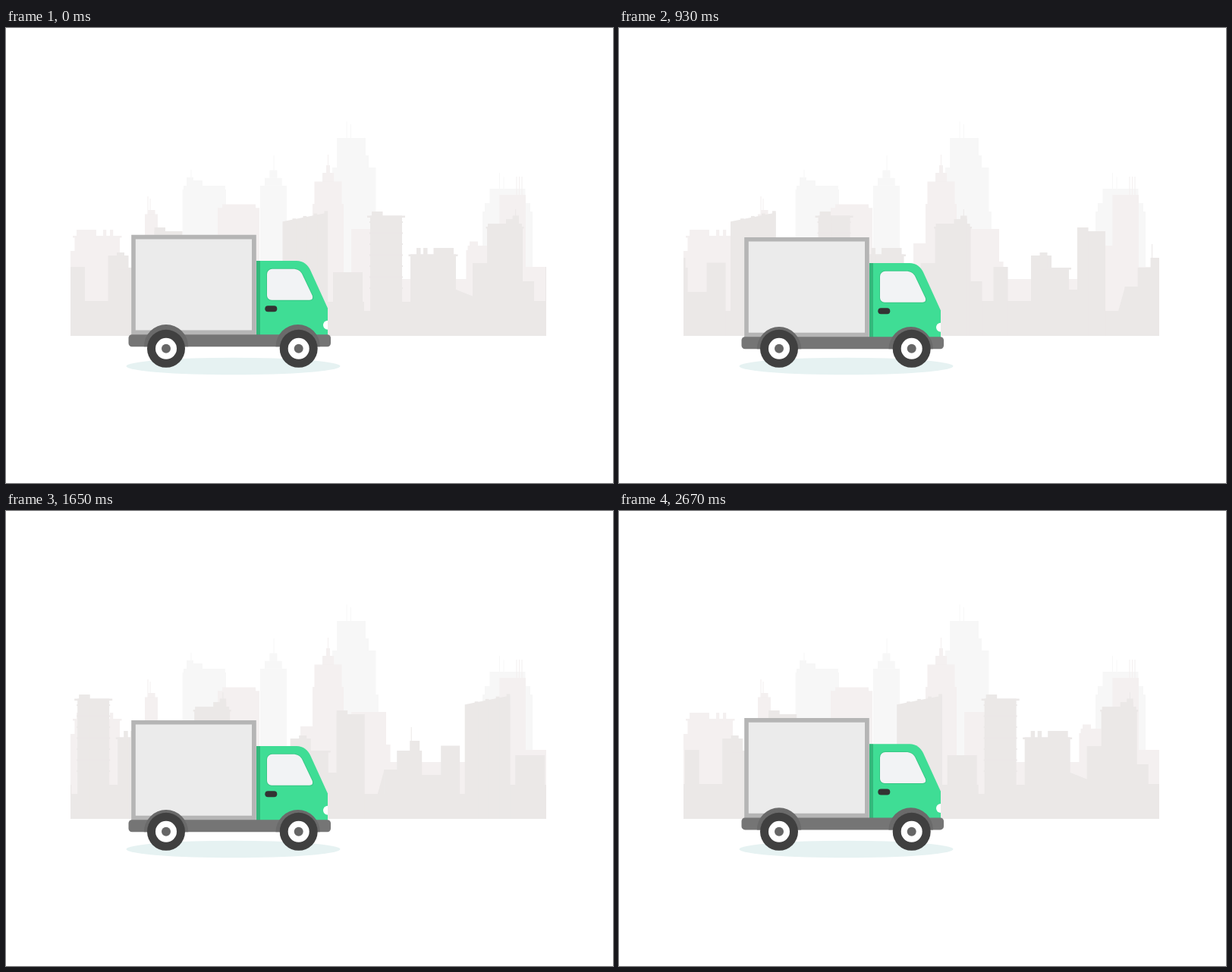
An HTML page with a canvas that plays this animation: 800x600 px, repeating every 2.7 s.

```html
<!DOCTYPE html>
<html lang="en">
<head>
<meta charset="utf-8">
<title>Delivery truck</title>
<style>
  html, body { margin: 0; width: 100%; height: 100%; overflow: hidden; background: #fff; }
  canvas { display: block; width: 800px; height: 600px; }
</style>
</head>
<body>
<canvas id="stage" width="800" height="600"></canvas>
<script>
const ctx = document.getElementById('stage').getContext('2d');
const LOOP = 2700, STEP = 30;
const BASE = 406, LEFT = 85, RIGHT = 712;
const TILE = 626, SPEED = 0.23383;
const REAR = 211, FRONT = 385.7;

function shape(color, trace) {
  ctx.fillStyle = color;
  ctx.beginPath();
  trace();
  ctx.fill();
}

const rect = (x, y, w, h, color) => shape(color, () => ctx.rect(x, y, w, h));
const rounded = (x, y, w, h, r, color) => shape(color, () => ctx.roundRect(x, y, w, h, r));
const disc = (x, y, r, color) => shape(color, () => ctx.arc(x, y, r, 0, Math.PI * 2));

// City helpers paint in the layer's current fill colour.
const block = (x1, x2, top, bottom = BASE) => ctx.fillRect(x1, top, x2 - x1, bottom - top);

function ledged(x1, x2, top, overhang) {
  block(x1, x2, top);
  block(x1 - overhang, x2 + overhang, top, top + 2.5);
}

// Symmetric tower of nested tiers, each given by half width and top.
function tower(center, ...tiers) {
  tiers.forEach(([half, top]) => block(center - half, center + half, top));
}

function antenna(x, top, height) {
  block(x - 0.5, x + 0.5, top, top + height);
}

function slope(x1, y1, x2, y2) {
  ctx.beginPath();
  ctx.moveTo(x1, BASE);
  ctx.lineTo(x1, y1);
  ctx.lineTo(x2, y2);
  ctx.lineTo(x2, BASE);
  ctx.fill();
}

function farCity() {
  ctx.fillStyle = '#f7f7f7';
  tower(261.3, [27.5, 208], [28.7, 213]);
  block(238, 259, 201);
  block(238, 247, 197);
  antenna(244, 187, 10);

  for (let i = 0; i < 3; i++) tower(352.4, [5 + 6.3 * i, 187.5 + 10.2 * i]);
  antenna(353, 168, 20);

  block(436, 474, 145);
  block(436, 478, 168);
  block(430, 487.5, 184);
  block(430, 491, 242);
  for (const x of [449, 454.5]) antenna(x, x / 1.5 - 176, 24);

  tower(661, [23.5, 212], [30, 231], [33, 242]);
  for (const x of [650.5, 656]) antenna(x, x - 459.5, 22);
}

function midCity() {
  ctx.fillStyle = '#f4f0f0';
  block(LEFT, 183, 323);
  block(445, RIGHT, 331);

  block(LEFT, 150, 294);
  ledged(90.5, 150, 274, 2.5);
  block(93, 119, 266);
  for (const x of [128, 137]) block(x, x + 4.3, 266);

  tower(191.5, [5, 240], [8.5, 245.5]);
  for (const x of [187, 190]) antenna(x, x + 35, 18);

  block(279, 334, 237.3);
  block(285, 329, 232.5);

  block(388, 405, 284);
  tower(424.5, [2.5, 181], [7.5, 191], [18, 202.5], [20.5, 232]);
  antenna(424.5, 167, 15);

  block(455, 501, 265);
  block(455, 506.5, 308);

  block(606.5, 625, 293);
  tower(616.5, [5.5, 281.5], [8, 287]);
  block(624, 652, 287);
  block(650.5, 685, 220);
  block(685, RIGHT, 315);
  for (let i = 0; i < 3; i++) antenna(673 + 3.5 * i, 196, 26);
}

function nearCity() {
  ctx.fillStyle = '#ebe8e7';
  block(LEFT, LEFT + TILE + 1, 373);
  block(420, 472, 361);
  block(510, 540, 361);
  block(680, 765, 360);

  block(LEFT, 104, 315);
  block(134.5, 161.5, 300);
  block(146, 156, 296);
  ledged(150, 184.5, 316, 3);
  block(180, 200, 345);
  block(195.5, 232.5, 268);
  block(195.5, 210, 263);

  slope(249.8, 372, 258.5, 341);
  block(258, 276, 341);
  block(275, 308, 316);
  block(292, 305, 303);
  antenna(294, 285, 20);
  block(300, 334, 348);
  block(333, 358, 309.5);

  slope(364.5, 255.3, 424, 243.5);
  for (let i = 0; i < 4; i++) {
    const x = 377.5 + 14 * i;
    block(x, x + 4.7, 251.2 - 3.3 * i);
  }

  block(431, 470, 322);
  ledged(480, 522, 247.5, 4);
  block(482, 496.5, 242);
  for (let y = 255; y < 345; y += 14.5) block(479, 523, y, y + 2);

  ledged(533, 593, 298.5, 2.5);
  for (const x of [541, 550]) block(x, x + 5.5, 290);
  block(563.5, 590, 290);
  slope(592, 344.5, 616, 354);

  block(615, 640, 310);
  ledged(634, 681, 262, 1.5);
  block(635, 680, 258);
  block(659, 676, 252);
  block(667.5, 676, 247.5);
  antenna(671.7, 239, 10);
  block(680, 696, 334);
}

function scrollingCity(t) {
  ctx.save();
  ctx.beginPath();
  ctx.rect(LEFT, 0, RIGHT - LEFT, 600);
  ctx.clip();
  ctx.translate(-TILE - t * SPEED, 0);
  for (let i = 0; i < 3; i++) {
    nearCity();
    ctx.translate(TILE, 0);
  }
  ctx.restore();
}

function cab() {
  ctx.save();
  shape('#3fdd95', () => {
    ctx.moveTo(330, 307);
    ctx.lineTo(383, 307);
    ctx.bezierCurveTo(392, 307, 397.5, 312, 401, 319);
    ctx.lineTo(424, 369.5);
    ctx.lineTo(424, 405);
    ctx.lineTo(330, 405);
  });
  ctx.clip();
  rect(330, 307, 5, 98, '#33b87b');
  disc(424, 391.7, 6, '#fff');
  ctx.restore();

  ctx.strokeStyle = '#37c885';
  ctx.lineWidth = 2;
  shape('#f2f3f5', () => {
    ctx.moveTo(344, 338);
    ctx.arcTo(344, 317.7, 378, 317.7, 7);
    ctx.lineTo(378, 317.7);
    ctx.bezierCurveTo(384, 317.7, 388, 320, 390.5, 325);
    ctx.lineTo(403.8, 353);
    ctx.quadraticCurveTo(405.5, 358.7, 400, 358.7);
    ctx.arcTo(344, 358.7, 344, 338, 6);
    ctx.closePath();
    ctx.stroke();
  });

  rounded(341.3, 366.2, 16, 8, 4, '#333');
}

function body() {
  rect(165.2, 272.8, 164.6, 132, '#b5b5b5');
  rect(170.8, 278.4, 153.2, 120.2, '#ebebeb');
  cab();
  rounded(161.5, 404.2, 266.5, 16, 4.5, '#757575');
  for (const x of [REAR, FRONT - 1]) {
    shape('#6a6a6a', () => ctx.arc(x, 420.2, 29.2, Math.PI, 0));
  }
}

function wheel(x) {
  disc(x, 422.8, 25, '#404040');
  disc(x, 422.8, 14, '#fff');
  disc(x, 422.8, 6, '#666');
}

function ease(u) {
  u = Math.min(1, Math.max(0, u));
  return u * u * (3 - 2 * u);
}

// The body sinks, stays low for a while, then settles back up.
function sink(t) {
  return 3.1 * ease(t / 650) * Math.exp(-Math.max(0, t - 1650) / 400);
}

function draw(t) {
  rect(0, 0, 800, 600, '#fff');
  farCity();
  midCity();
  scrollingCity(t);
  shape('#e6f2f2', () => ctx.ellipse(299.5, 446, 141, 11.3, 0, 0, Math.PI * 2));

  ctx.save();
  ctx.translate(0, sink(t));
  body();
  ctx.restore();
  wheel(REAR);
  wheel(FRONT);
}

function tick() {
  const t = performance.now() % LOOP;
  draw(Math.floor(t / STEP) * STEP);
  requestAnimationFrame(tick);
}
tick();
</script>
</body>
</html>
```
